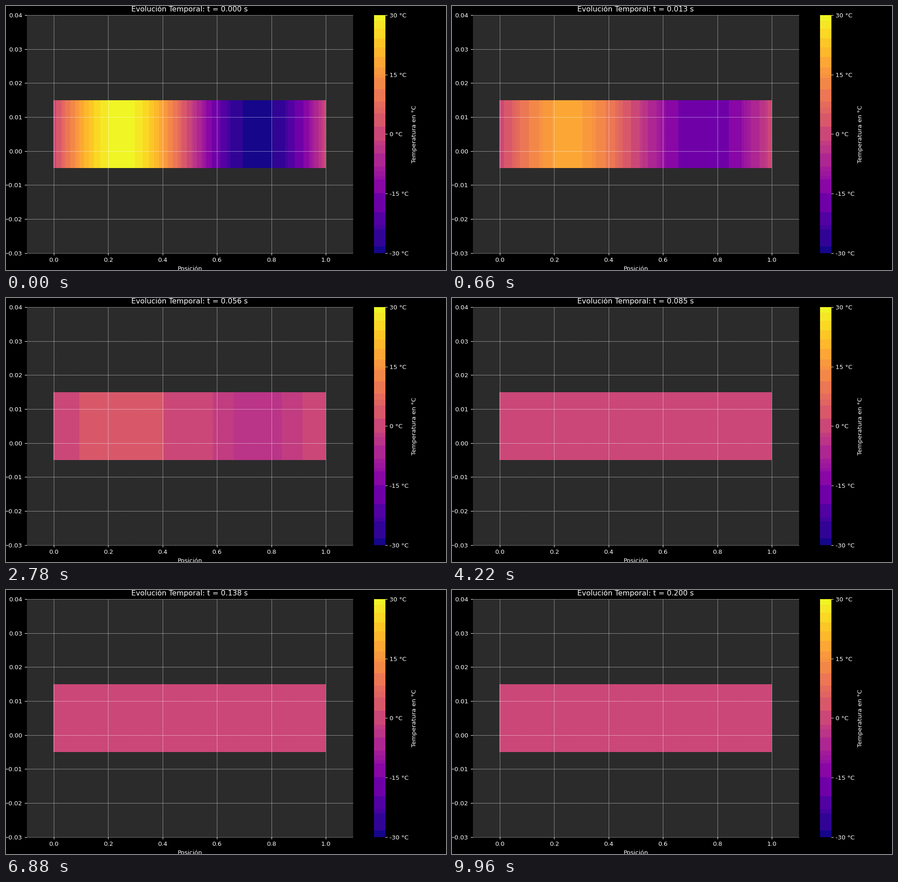
A matplotlib script that plays this animation: 966 px wide and 580 px high, repeating every 10000 ms.

```python
import matplotlib.pyplot as plt
import numpy as np
from matplotlib.animation import FuncAnimation
from matplotlib.patches import Rectangle

W, H, DPI = 966, 580, 100
SCALE = 0.96  # type and line sizes follow a 96 dpi screen
FRAMES, INTERVAL = 500, 20
T_END, T_MAX = 0.2, 30.0
LEFT, RIGHT, TOP, BOTTOM = 46, 762, 20, 543
BAR = (104, 702, 356, 207)
LEGEND = (808, 833, BOTTOM, TOP)

plt.rcParams["font.family"] = "DejaVu Sans"
plt.rcParams["font.size"] = 10 * SCALE
plt.rcParams["text.color"] = "white"

# Rows on the colour scale where one flat colour gives way to the next
STEPS = np.array([32, 50, 71, 91, 112, 135, 150, 158, 183, 210, 223, 236, 265,
                  296, 306, 324, 353, 363, 374, 381, 411, 453, 482, 491, 528])


def x_px(v):
    return 105 + 597 * v


def y_px(v):
    return 318.6 - 7470 * v


def temp_px(temp):
    return 281.3 - 8.715 * temp


def row_to_temp(row):
    return (281.3 - row) / 8.715


def pixel(p):
    """Centre of the pixel nearest to p."""
    return np.floor(p + 0.5) + 0.5


LIMITS = row_to_temp(STEPS)[::-1]
bounds = np.concatenate(([-T_MAX], LIMITS, [T_MAX]))
middles = (bounds[:-1] + bounds[1:]) / 2
PALETTE = plt.get_cmap("plasma")((middles + T_MAX) / (2 * T_MAX))[:, :3]


def colorize(temp):
    return PALETTE[np.searchsorted(LIMITS, temp)]


fig = plt.figure(figsize=(W / DPI, H / DPI), dpi=DPI, facecolor="black")
ax = fig.add_axes([0, 0, 1, 1])
ax.axis("off")
ax.add_patch(Rectangle((LEFT, TOP), RIGHT - LEFT, BOTTOM - TOP,
                       facecolor="#2b2b2b", edgecolor="none", zorder=0))

x = (np.arange(BAR[1] - BAR[0]) + 0.5) / (BAR[1] - BAR[0])
profile = T_MAX * np.sin(2 * np.pi * x)
image_style = dict(aspect="auto", interpolation="nearest", zorder=1)
bar = ax.imshow(colorize(profile)[None], extent=BAR, **image_style)

legend_temps = row_to_temp(np.arange(TOP, BOTTOM) + 0.5)
ax.imshow(colorize(legend_temps)[:, None], extent=LEGEND, **image_style)

# Grid and ticks
x_vals = np.arange(6) * 0.2
y_vals = np.arange(-3, 5) * 0.01
temps = np.arange(-30, 31, 15)
cols, rows = pixel(x_px(x_vals)), pixel(y_px(y_vals))
grid = dict(colors="white", linewidths=0.5 * SCALE, linestyles="--",
            snap=False)
ax.vlines(cols, BOTTOM + 0.5, TOP, **grid)
ax.hlines(rows, LEFT + 0.5, RIGHT, **grid)

tick = dict(colors="white", linewidths=0.8 * SCALE, snap=False)
tick_len = 3.5 * SCALE * DPI / 72
ax.vlines(cols, BOTTOM, BOTTOM + tick_len, **tick)
ax.hlines(rows, LEFT - tick_len, LEFT, **tick)
ax.hlines(pixel(temp_px(temps)), LEGEND[1], LEGEND[1] + tick_len, **tick)

# Labels
for v in x_vals:
    ax.text(x_px(v), 552.1, f"{v:.1f}", ha="center", va="top")
for v, k in zip(y_vals, range(-3, 5)):
    sign = "\u2212" if k < 0 else ""
    ax.text(36, y_px(v), f"{sign}{abs(v):.2f}",
            ha="right", va="center_baseline")
for v in temps:
    ax.text(842.5, temp_px(v), f"{v} °C", ha="left", va="center_baseline")
ax.text(403.5, 571.3, "Posición", ha="center", va="top")
ax.text(889.6, temp_px(0), "Temperatura en °C", rotation=90,
        rotation_mode="anchor", ha="center", va="top")
title = ax.text(403, 12, "", fontsize=12 * SCALE, ha="center", va="baseline")

ax.set_xlim(0, W)
ax.set_ylim(H, 0)


def update(i):
    t = T_END * i / (FRAMES - 1)
    bar.set_data(colorize(profile * np.exp(-4 * np.pi ** 2 * t))[None])
    title.set_text(f"Evolución Temporal: t = {t:.3f} s")
    return bar, title


anim = FuncAnimation(fig, update, frames=FRAMES, interval=INTERVAL,
                     repeat=True, repeat_delay=0, cache_frame_data=False)
plt.show()
```
